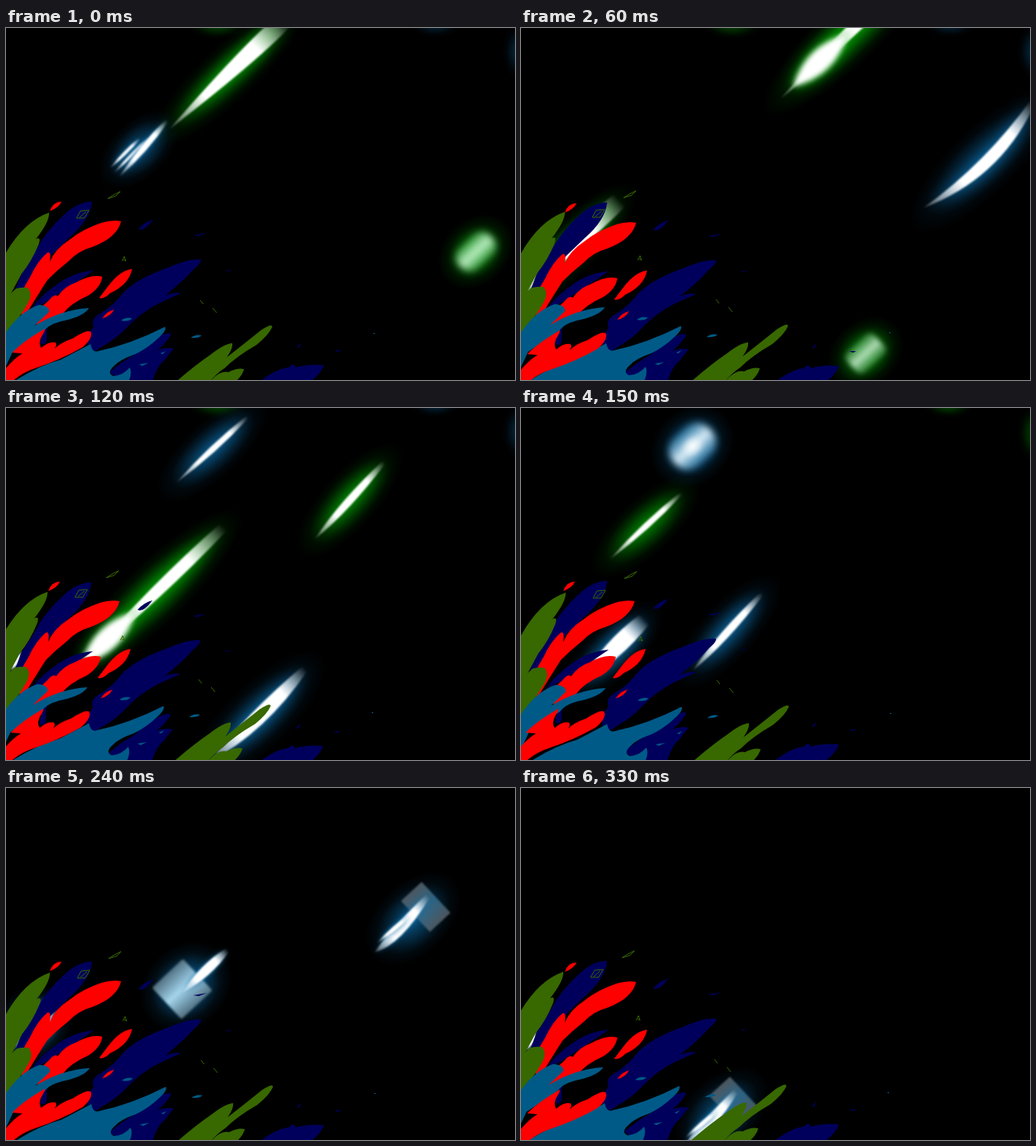
Animation of 650x450 px, one loop 0.36 s. Source, as an HTML page with a canvas:

```html
<!DOCTYPE html>
<html>
<head>
<meta charset="utf-8">
<style>
html, body { margin: 0; width: 650px; height: 450px; overflow: hidden; background: #000; }
canvas { display: block; }
</style>
</head>
<body>
<canvas id="stage" width="650" height="450"></canvas>
<script>
const ctx = document.getElementById('stage').getContext('2d');
const STEP = 30, STEPS = 12;
const GREEN = '0,160,0', BLUE = '10,105,165';
const RED = '#f00', OLIVE = '#386800', NAVY = '#00005c', TEAL = '#005a87';

// Per-step shake of each paint colour, as x,y pairs.
const pairs = s => s.split(' ').map(p => p.split(',').map(Number));
const leafShake = pairs('0,0 0,0 1,-1 0,0 -2,-1 2,0 2,0 3,2 1,0 2,-1 0,0 -1,-1');
const shake = {
  [RED]: pairs('0,0 0,0 0,2 0,0 -2,0 -2,0 0,0 2,1 0,0 0,2 0,0 0,1'),
  [NAVY]: pairs('0,0 0,0 0,1 0,0 -1,1 0,-1 0,0 3,1 0,0 -3,-1 0,0 0,-1'),
  [OLIVE]: leafShake,
  [TEAL]: leafShake
};

const paint = [
  [NAVY, 'M110,222Q92,222 75,238Q50,260 36,288L20,313L9,343L24,334Q42,310 58,290L82,267Q108,244 110,222Z'],
  [NAVY, 'M112,310Q85,312 62,330Q42,344 32,360L52,350Q90,325 112,310Z'],
  [NAVY, 'M62,362Q45,385 44,403Q52,408 52,395Q50,380 62,362Z'],
  [NAVY, 'M249,296Q235,294 205,307Q168,320 150,338Q138,354 122,364Q107,372 112,382L104,394V408Q112,417 120,409Q143,396 155,382Q172,364 195,352Q210,345 224,339Q215,337 203,342Q225,325 240,308Q250,300 249,296Z'],
  [NAVY, 'M207,390Q214,390 208,396Q200,408 192,412Q205,407 214,410Q207,418 203,424Q192,432 186,455H152L132,440Q150,425 165,417Q190,393 207,390Z'],
  [NAVY, 'M320,455Q345,435 361,434Q368,427 370,434Q385,429 406,431Q402,443 385,455Z'],
  [NAVY, 'M188,245Q178,247 169,257Q176,261 188,245ZM239,265L257,262L246,266ZM280,309L288,310L284,311ZM371,409L377,402L375,408ZM419,412L428,412L424,414Z'],
  [OLIVE, 'M-6,298Q20,248 55,236Q56,247 38,270Q45,266 42,276Q33,298 20,314L5,342L-6,355Z'],
  [RED, 'M147,247Q137,245 122,249Q98,257 82,270Q62,283 56,299Q58,285 53,287Q40,298 31,318Q18,338 15,355L22,372Q40,342 53,322Q66,309 80,298Q92,285 110,280Q142,268 147,247Z'],
  [RED, 'M123,318Q110,314 90,325Q75,330 66,343Q62,339 55,348Q40,360 30,380L45,378Q62,378 72,366Q82,352 105,342Q121,332 123,318Z'],
  [RED, 'M161,308Q146,310 132,328L119,345Q125,347 133,339Q157,328 161,308ZM138,360Q129,362 123,371Q133,369 138,360ZM71,222Q60,222 56,234Q67,230 71,222Z'],
  [OLIVE, 'M-6,350L13,333Q21,331 28,332Q34,340 29,350Q18,370 -6,400Z'],
  [TEAL, 'M-6,398Q15,363 42,354Q56,355 55,363L36,381Q70,360 106,358Q100,368 75,374Q55,378 48,388L8,415L-6,445Z'],
  [TEAL, 'M5,455Q40,432 70,424L108,404Q110,416 118,413Q160,404 203,382Q206,386 195,396Q180,410 165,417Q145,424 138,432Q128,441 137,445Q150,444 158,434Q162,442 155,455Z'],
  [RED, 'M-6,442Q8,424 21,416L8,415Q20,402 47,386Q52,382 48,390Q40,402 45,409Q55,400 63,402Q66,405 62,410Q70,402 85,397Q103,385 108,388Q112,396 98,408Q70,424 40,434Q18,441 5,455H-6Z'],
  [TEAL, 'M147,374Q152,369 161,371Q157,376 147,374ZM236,396Q242,391 250,393Q245,397 236,396ZM170,430L182,428L174,432ZM197,416L204,413L200,417ZM469,390h2v1h-2Z'],
  [OLIVE, 'M214,455Q240,432 262,417Q280,403 289,403Q290,410 282,421Q310,399 326,386Q340,377 340,382Q336,392 320,405Q294,420 279,435Q268,442 258,455Z'],
  [OLIVE, 'M258,455Q272,437 284,440Q295,434 304,436Q302,445 290,455Z']
].map(([color, d]) => [color, new Path2D(d)]);

const outlines = new Path2D('M90,243L95,234L106,233L100,243ZM94,242L102,235M130,218L138,213L146,209L140,215ZM148,298L151,292L153,298L150,296M248,348L252,353M264,358L269,364');

function glow(x, y, rx, ry, color, power = .75, angle = -.77) {
  ctx.save();
  ctx.translate(x, y);
  ctx.rotate(angle);
  ctx.scale(rx, ry);
  const g = ctx.createRadialGradient(0, 0, 0, 0, 0, 1);
  g.addColorStop(0, `rgba(${color},${power})`);
  g.addColorStop(.4, `rgba(${color},${power * .55})`);
  g.addColorStop(.75, `rgba(${color},${power * .12})`);
  g.addColorStop(1, `rgba(${color},0)`);
  ctx.fillStyle = g;
  ctx.fillRect(-1, -1, 2, 2);
  ctx.restore();
}

// Tapered streak; the origin is its pointed head and it trails up and right.
function streak(dx, dy, width, color, { peak = .5, bulge = 0, bend = 0, tail = .25, halo = 36, power = .65 } = {}) {
  const length = Math.hypot(dx, dy), angle = Math.atan2(dy, dx);
  const p = peak * length, end = tail * width;
  ctx.save();
  ctx.rotate(angle);
  if (halo) glow(length / 2, bend * .7, length / 2 + 28, halo, color, power, 0);
  const g = ctx.createLinearGradient(0, 0, length, 0);
  g.addColorStop(0, 'rgba(255,255,255,.2)');
  g.addColorStop(.3, '#fff');
  g.addColorStop(.75, '#fff');
  g.addColorStop(1, 'rgba(255,255,255,0)');
  ctx.fillStyle = g;
  ctx.shadowColor = `rgb(${color})`;
  ctx.shadowBlur = halo ? 16 : 6;
  ctx.filter = 'blur(1px)';
  ctx.beginPath();
  ctx.moveTo(0, 0);
  ctx.quadraticCurveTo(p, 2 * bend - width, length, -end);
  ctx.lineTo(length, end);
  ctx.quadraticCurveTo(p, 2 * bend + width, 0, 0);
  ctx.fill();
  if (bulge) {
    ctx.filter = 'blur(3px)';
    ctx.fillStyle = '#fff';
    ctx.beginPath();
    ctx.moveTo(bulge - 48, 0);
    ctx.quadraticCurveTo(bulge, -28, bulge + 48, 0);
    ctx.quadraticCurveTo(bulge, 28, bulge - 48, 0);
    ctx.fill();
  }
  ctx.restore();
}

// Soft slab, brightest along its middle.
function slab(length, width, edge, core, blur, round) {
  ctx.save();
  ctx.rotate(-.75);
  const g = ctx.createLinearGradient(0, -width / 2, 0, width / 2);
  g.addColorStop(0, edge);
  g.addColorStop(.5, core);
  g.addColorStop(1, edge);
  ctx.fillStyle = g;
  ctx.filter = `blur(${blur}px)`;
  ctx.beginPath();
  ctx.roundRect(-length / 2, -width / 2, length, width, round);
  ctx.fill();
  ctx.restore();
}

function at(x, y, draw) {
  ctx.save();
  ctx.translate(x, y);
  draw();
  ctx.restore();
}

function fork() {
  glow(0, 0, 62, 36, BLUE, .75);
  const prong = (x, y, dx, dy, w) => at(x, y, () => streak(dx, dy, w, BLUE, { halo: 0 }));
  prong(-37, 24, 38, -38, 4);
  prong(-32, 30, 46, -46, 4);
  prong(-25, 35, 61, -72, 7);
}

function greenBlob(step) {
  glow(0, 0, 54, 42, GREEN, .9);
  if (step < 1) slab(54, 34, 'rgba(90,190,100,.6)', '#c4f2cc', 4, 14);
  else slab(48, 34, 'rgba(90,170,100,.45)', '#b8e0be', 3, 8);
}

function blueBlob() {
  glow(0, 0, 58, 48, BLUE, 1);
  slab(62, 46, 'rgba(70,150,195,.6)', '#e4f4fc', 4, 20);
  glow(0, 0, 20, 16, '255,255,255', .9);
}

function square() {
  glow(5, -3, 64, 52, BLUE, 1);
  slab(54, 55, 'rgba(110,140,155,.75)', '#a5d5ec', 1.5, 2);
  at(0, 5, () => streak(58, -55, 11, BLUE, { halo: 0 }));
}

function rocket() {
  glow(0, 0, 72, 46, BLUE, .8);
  at(16, -15, () => slab(36, 54, 'rgba(85,95,102,.9)', 'rgba(55,115,150,.8)', 1, 1));
  at(-49, 43, () => streak(68, -72, 12, BLUE, { halo: 0, peak: .3, bend: 3 }));
  at(-46, 31, () => streak(42, -35, 5, BLUE, { halo: 0 }));
}

// Each flyer: first step, last step, x, y at the first step, dx, dy per step, draw.
const flyers = [
  [0, 1, 170, 155, -85, 80, fork],
  [0, 2, 209, 129, -115, 115, () => streak(147, -139, 14, GREEN, { peak: .7, tail: .75 })],
  [0, 3, 600, 286, -80, 65, greenBlob],
  [1, 3, 641, 120, -127, 110, () => streak(140, -136, 14, BLUE, { bend: 14, halo: 42 })],
  [4, 4, 260, 452, -127, 110, () => streak(122, -119, 17, BLUE, { peak: .45, bend: 3, halo: 42 })],
  [2, 4, 332, 90, -115, 116, s => streak(176, -170, 12, GREEN, { peak: .5, bulge: s < 3 ? 70 : 40, tail: .5, halo: 40, power: .85 })],
  [5, 5, 74, 352, -115, 116, () => streak(84, -82, 17, BLUE, { tail: .5 })],
  [3, 6, 322, -3, -104, 98, s => streak(91, -84, 7, s < 5 ? BLUE : GREEN)],
  [3, 5, 570, -1, -175, 168, s => streak(88, -98, 9, s < 5 ? GREEN : BLUE, { peak: .42 })],
  [5, 8, 219, 49, -62, 85, blueBlob],
  [6, 8, 485, -5, -130, 131, square],
  [7, 11, 608, 84, -88, 83, rocket]
];

function ambient(step) {
  if (step < 5) {
    glow(270, -4, 38, 18, GREEN, .45, 0);
    glow(548, -4, 32, 16, BLUE, .35, 0);
    glow(654, 30, 20, 36, BLUE, .4, 0);
  } else if (step < 6) {
    glow(546, -4, 32, 17, GREEN, .45, 0);
    glow(654, 32, 20, 36, GREEN, .4, 0);
  }
  if (step === 4 || step === 11) at(5, 337, () => streak(16, -26, 6, BLUE, { halo: 0 }));
}

function draw(step) {
  ctx.fillStyle = '#000';
  ctx.fillRect(0, 0, 650, 450);
  ambient(step);
  for (const [first, last, x, y, dx, dy, shape] of flyers) {
    const n = step - first;
    if (n >= 0 && step <= last) at(x + dx * n, y + dy * n, () => shape(step));
  }
  for (const [color, path] of paint) {
    ctx.fillStyle = color;
    at(...shake[color][step], () => ctx.fill(path));
  }
  ctx.strokeStyle = OLIVE;
  at(...shake[OLIVE][step], () => ctx.stroke(outlines));
}

let shown = -1;
function tick() {
  const step = Math.floor(performance.now() / STEP) % STEPS;
  if (step !== shown) draw(shown = step);
  requestAnimationFrame(tick);
}
tick();
</script>
</body>
</html>
```
